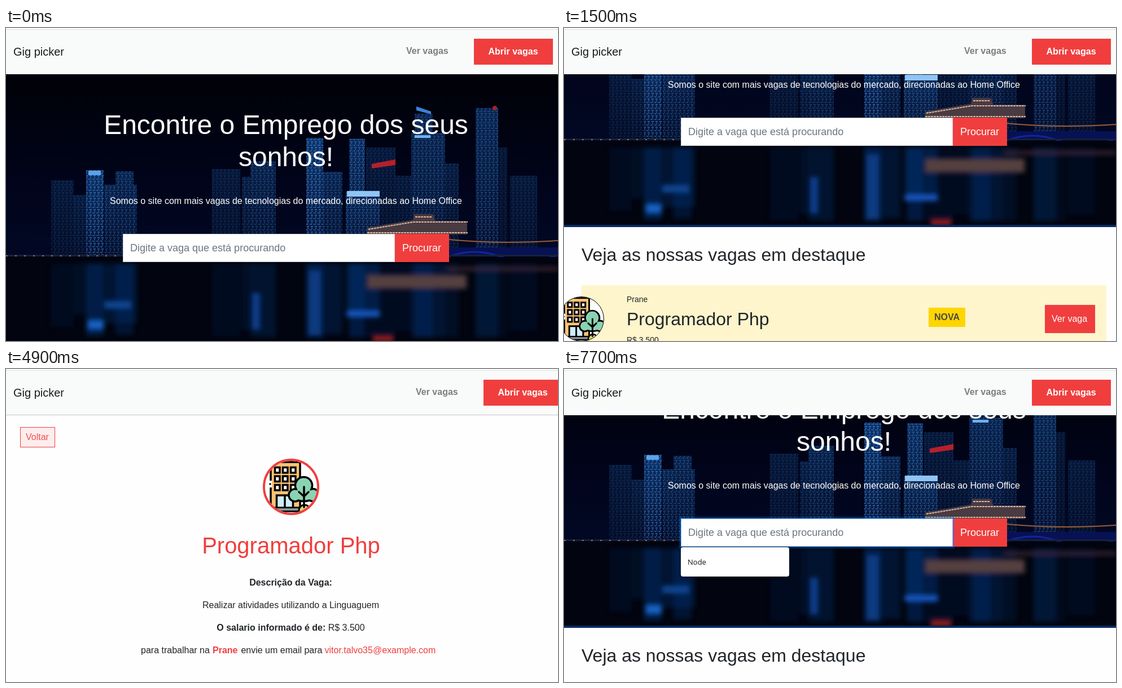
Recreate the animation shown at these times as an HTML page. Size 978 by 555 pixels, loop 8 s.

```html
<!DOCTYPE html>
<html lang="pt-BR">
<head>
<meta charset="utf-8">
<title>Vagas</title>
<style>
html, body { margin: 0; width: 100%; height: 100%; overflow: hidden; background: #fefefe; }
svg { display: block; width: 100%; height: 100%; }
text { font-family: "Liberation Sans", Arial, sans-serif; white-space: pre; }
</style>
</head>
<body>
<svg id="stage" viewBox="0 0 978 555"></svg>
<script>
const RED = '#f03e3e', INK = '#212529', LOOP = 8000, STEP = 100;

const rect = (x, y, w, h, fill, more = '') =>
  `<rect x="${x}" y="${y}" width="${w}" height="${h}" fill="${fill}" ${more}/>`;
const text = (x, y, size, fill, str, more = '') =>
  `<text x="${x}" y="${y}" font-size="${size}" fill="${fill}" ${more}>${str}</text>`;
const circle = (x, y, r, fill, more = '') =>
  `<circle cx="${x}" cy="${y}" r="${r}" fill="${fill}" ${more}/>`;
const group = (id, body, more = '') => `<g id="${id}" ${more}>${body}</g>`;
const BOLD = 'font-weight="700"', MID = 'text-anchor="middle"';

const defs = `<defs>
  <linearGradient id="sky" x1="0" y1="0" x2="0" y2="1">
    <stop offset="0" stop-color="#000107"/><stop offset=".4" stop-color="#01041a"/>
    <stop offset=".67" stop-color="#020824"/><stop offset=".72" stop-color="#02050f"/>
    <stop offset="1" stop-color="#010209"/>
  </linearGradient>
  <linearGradient id="tower" x1="0" y1="0" x2="0" y2="1">
    <stop offset="0" stop-color="#0d3a78"/><stop offset="1" stop-color="#04123a"/>
  </linearGradient>
  <pattern id="lights" width="7" height="10" patternUnits="userSpaceOnUse">
    <path d="M1 2h4M2 5h2M0 8h3M5 8h1" stroke="#5aa4ea" stroke-width="1.4"/>
  </pattern>
  <filter id="soft" x="-20%" y="-20%" width="140%" height="140%"><feGaussianBlur stdDeviation="4"/></filter>
  <filter id="shade" x="-10%" y="-20%" width="120%" height="150%">
    <feDropShadow dx="0" dy="2" stdDeviation="2" flood-opacity=".4"/>
  </filter>
  <clipPath id="photoBox">${rect(0, 82, 978, 473, '#000')}</clipPath>
  <clipPath id="disc">${circle(0, 0, 46, '#000')}</clipPath>
</defs>`;

// x, top, width, glow
const towers = [
  [80, 270, 40, .25], [120, 296, 22, .3], [142, 252, 31, .8], [174, 278, 58, .5], [194, 254, 32, .5],
  [365, 250, 50, .25], [418, 264, 16, .35], [433, 236, 45, .45], [532, 195, 30, .85], [562, 255, 34, .5],
  [608, 196, 28, .7], [638, 212, 52, .25], [602, 290, 60, .6], [690, 262, 30, .25], [724, 152, 32, .5],
  [718, 186, 60, .5], [778, 240, 24, .3], [832, 142, 40, .55], [872, 212, 16, .2], [893, 262, 48, .25]
];

function photo() {
  const city = towers.map(([x, y, w, glow]) => {
    const h = 402 - y;
    return rect(x, y, w, h, '#020a22') +
      rect(x, y, w, h, 'url(#tower)', `opacity="${glow}"`) +
      rect(x, y, w, h, 'url(#lights)', `opacity="${glow * .75}"`);
  }).join('');
  const mirror = towers.map(([x, y, w, glow]) =>
    rect(x, 418, w, Math.min(130, (402 - y) * .85), '#0b3a86', `opacity="${glow * .6}"`)).join('');
  const gleams = rect(145, 518, 28, 16, '#1462c4') + rect(174, 484, 48, 14, '#0c458f') +
    rect(436, 470, 14, 65, '#0a3d8c') + rect(536, 430, 22, 115, '#0a3a80') +
    rect(604, 501, 58, 11, '#1457c0') + rect(640, 438, 176, 24, '#54403f') +
    rect(780, 424, 198, 6, '#3a2530') + rect(650, 545, 36, 12, '#8e1a1a');
  const details =
    `<path d="M727 139l26 9v5l-26-7z" fill="#3f7fd8"/>` +
    `<path d="M648 241l42-8v10l-42 6z" fill="#b5202c"/>` +
    rect(604, 289, 58, 10, '#8fc4f4') + rect(724, 190, 28, 5, '#6fb0ee') +
    rect(146, 253, 22, 8, '#5ba2e8') + circle(866, 142, 4, '#a3222c') +
    `<path d="M722 330h34l5 12h56v24H640v-12l82-14z" fill="#4a3a42"/>` +
    `<path d="M642 357l80-13h96M640 363h178M725 335h30" stroke="#d8b8a0" stroke-width="2" stroke-dasharray="4 1" fill="none"/>` +
    `<path d="M785 375q90 9 193 2" stroke="#9c5c38" stroke-width="2" fill="none"/>` +
    rect(785, 389, 193, 14, '#071154') +
    `<path d="M785 405q45-16 90 0t103-2" stroke="#1423a0" stroke-width="3" fill="none"/>` +
    rect(0, 402, 978, 3, '#15203c') +
    `<path d="M0 404H207" stroke="#9a6a48" stroke-width="2" stroke-dasharray="3 13"/>`;
  return `<g clip-path="url(#photoBox)">${rect(0, 82, 978, 473, 'url(#sky)')}${city}${details}` +
    rect(0, 406, 978, 149, '#02050f') + `<g filter="url(#soft)">${mirror}${gleams}</g></g>`;
}

function icon(x, y, scale, ring, width) {
  let panes = '';
  for (let i = 0; i < 9; i++)
    panes += rect(-28.5 + i % 3 * 14, -34.5 + Math.floor(i / 3) * 15.5, 8.5, 9.5, '#fff');
  const art = rect(-50, -50, 100, 100, '#fff') +
    `<g stroke="#000" stroke-width="3.5" stroke-linecap="round">` +
    rect(-36, -44, 52, 81, '#fdc374') + panes +
    rect(-25.5, 15, 29, 22, '#cdeefb') + `<path d="M-11 15V37"/></g>` +
    rect(-39, 36, 56, 9, '#000') + rect(-37, 38, 52, 4, '#8c979d') +
    rect(-39, -11, 5, 12, '#fff') + circle(-37, -5, 1.8, '#000') +
    circle(24, 42, 10, '#d5dc62', 'stroke="#000" stroke-width="3"') +
    `<path d="M9 4A15 15 0 1 1 36 4A11 11 0 1 1 33 24Q22 27 13 24A11 11 0 1 1 9 4Z" fill="#8ad3b2" stroke="#000" stroke-width="3.5"/>` +
    `<path d="M23 0V36M23 17L14 9M23 17L31 9" stroke="#000" stroke-width="3.5" fill="none" stroke-linecap="round"/>`;
  return `<g transform="translate(${x} ${y}) scale(${scale})"><g clip-path="url(#disc)">${art}</g></g>` +
    circle(x, y, 46 * scale + width / 2, 'none', `stroke="${ring}" stroke-width="${width}"`);
}

function card(y, firm, role, pay, fresh, id) {
  const d = fresh ? 0 : 1;
  const box = fresh ? rect(31, y, 930, 120, '#fef5cc', 'rx="4"')
    : rect(31.5, y + .5, 929, 121, '#fff', 'rx="3" stroke="#bfbfbf"');
  const badge = fresh ? rect(646, y + 40, 65, 34, '#ffd500') + text(656, y + 62, 16, '#4a4a48', 'NOVA', BOLD) : '';
  return box + icon(31 + d, y + 60 + d, 39 / 46, '#000', 1) +
    text(111 + d, y + 30 + d, 14, INK, firm) + text(111 + d, y + 71 + d, 32, INK, role) +
    text(111 + d, y + 102 + d, 14, INK, pay) + badge +
    group(id, rect(852 - d, y + 35 + d, 89, 50, RED) + text(864 - d, y + 65 + d, 16, '#fff', 'Ver vaga'));
}

const home = photo() +
  text(496, 188, 48, '#fff', 'Encontre o Emprego dos seus', MID) +
  text(496, 245, 48, '#fff', 'sonhos!', MID) +
  text(496, 312, 16, '#fff', 'Somos o site com mais vagas de tecnologias do mercado, direcionadas ao Home Office', MID) +
  rect(689, 365, 96, 50, RED) + text(702, 396, 18, '#fff', 'Procurar') +
  rect(207.5, 365.5, 481, 49, '#fff', 'stroke="#ced4da"') +
  group('focus',
    rect(205.4, 363.4, 485.2, 53.2, 'none', 'stroke="#007bff" stroke-opacity=".3" stroke-width="3.2"') +
    rect(207.5, 365.5, 481, 49, 'none', 'stroke="#80bdff"')) +
  text(220, 396, 18, '#6c757d', 'Digite a vaga que está procurando') +
  group('caret', rect(220, 380, 1, 20, '#495057')) +
  group('menu', rect(207, 416, 192, 52, '#fff', 'rx="4" filter="url(#shade)"') +
    text(219, 447, 13, '#111', 'Node', `style="font-family:'Open Sans','Noto Sans',sans-serif"`)) +
  rect(0, 555, 978, 4, '#022b62') +
  text(31, 619, 32, INK, 'Veja as nossas vagas em destaque') +
  card(662, 'Prane', 'Programador Php', 'R$ 3.500', true, 'pick') +
  card(790, 'Fobim', 'Desenvolvedor Back-End', 'R$ 4500', true, 'pick2') +
  card(918, 'Etiloss', '', '', false, 'pick3');

const detail =
  rect(25.5, 103.5, 61, 35, '#fff', `id="backBox" stroke="${RED}"`) +
  text(35, 126, 16, RED, 'Voltar', 'id="backText"') +
  icon(505, 209, 1, RED, 4) +
  text(505, 327, 40, RED, 'Programador Php', MID) +
  text(504.5, 384, 16, INK, 'Descrição da Vaga:', `${MID} ${BOLD}`) +
  text(504.5, 424, 16, INK, 'Realizar atividades utilizando a Linguaguem', MID) +
  text(504.5, 464, 16, INK, `<tspan ${BOLD}>O salario informado é de:</tspan> R$ 3.500`, MID) +
  text(239, 504, 16, INK, `para trabalhar na <tspan x="366" fill="${RED}" ${BOLD}>Prane</tspan>` +
    `<tspan x="416.4">envie um email para</tspan><tspan x="564.5" fill="${RED}">vitor.talvo35@example.com</tspan>`);

const header = rect(0, 0, 978, 82, '#fff') + rect(0, 3, 978, 79, '#f9fafa') + rect(0, 2, 978, 1, '#dcdcdc') +
  rect(0, 81, 978, 1, '#c6c6c6', 'id="rule"') + text(13, 49, 20, '#1a1a1a', 'Gig picker') +
  group('nav', text(709, 46, 16, '#7c7d7d', 'Ver vagas', `${BOLD} id="navLink"`) +
    rect(829, 19, 140, 46, RED, 'id="navBox"') + text(854.5, 47, 16, '#fff', 'Abrir vagas', BOLD));

document.getElementById('stage').innerHTML = defs + rect(0, 0, 978, 555, '#fefefe') +
  group('home', home) + group('detail', detail) + header;

const el = id => document.getElementById(id);
const set = (id, name, value) => el(id).setAttribute(name, value);
const show = (id, on) => set(id, 'visibility', on ? 'inherit' : 'hidden');
const clamp = v => Math.max(0, Math.min(1, v));
const ease = v => { v = clamp(v); return v * v * (3 - 2 * v); };
const mix = (a, b, k) => `rgb(${a.map((v, i) => Math.round(v + (b[i] - v) * k))})`;
const between = (t, a, b) => t >= a && t < b;
const WHITE = [255, 255, 255], ROSE = [240, 62, 62];

// Each wheel notch scrolls the page by 100 px.
const wheel = starts => t => Math.round(starts.reduce((sum, s) => sum + 100 * ease((t - s) / 220), 0));
const firstScroll = wheel([768, 1087, 1468, 1787]);
const lastScroll = wheel([6475]);

function draw(t) {
  const onDetail = between(t, 3200, 5700);
  set('home', 'visibility', onDetail ? 'hidden' : 'visible');
  set('detail', 'visibility', onDetail ? 'visible' : 'hidden');
  set('nav', 'transform', `translate(${onDetail ? 17 : 0} 0)`);
  set('rule', 'fill', onDetail ? '#c6c6c6' : '#f0f1f1');
  set('home', 'transform', `translate(0 ${-(t < 3200 ? firstScroll(t) : lastScroll(t))})`);

  set('navBox', 'fill', between(t, 200, 300) ? '#e53838' : RED);
  set('navLink', 'fill', between(t, 300, 400) ? '#4b4b4b' : '#7c7d7d');

  const grow = 1 + .05 * ease((t - 2600) / 300);
  set('pick', 'transform', `translate(896.5 722) scale(${grow}) translate(-896.5 -722)`);

  const back = ease((t - 4830) / 370);
  set('backBox', 'fill', mix(WHITE, ROSE, back));
  set('backText', 'fill', mix(ROSE, WHITE, back));

  set('focus', 'opacity', clamp((t - 7100) / 200));
  show('caret', between(t, 7200, 7700));
  show('menu', t >= 7400);
}

function tick(now) {
  draw(Math.floor(now % LOOP / STEP) * STEP);
  requestAnimationFrame(tick);
}
draw(0);
requestAnimationFrame(tick);
</script>
</body>
</html>
```
